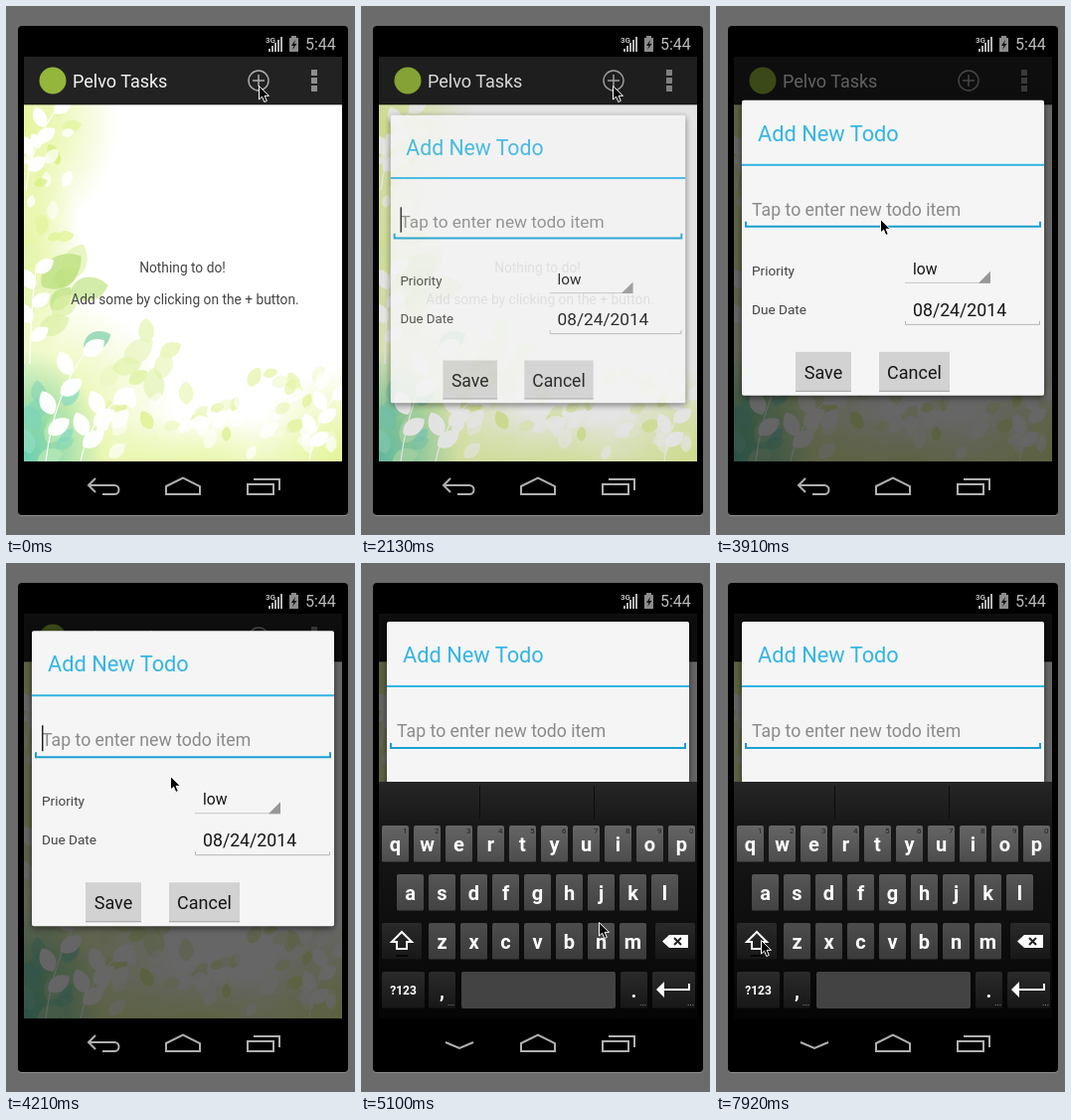
An HTML page that plays this animation: 351 by 532 pixels, repeating every 8 s.

```html
<!DOCTYPE html>
<html lang="en">
<head>
<meta charset="utf-8">
<title>Todo demo</title>
<style>
html, body { margin: 0; width: 100%; height: 100%; overflow: hidden; background: #6b6b6b; }
svg { display: block; width: 351px; height: 532px; }
text { font-family: Roboto, sans-serif; white-space: pre; }
.line { fill: none; stroke: #b0b0b0; stroke-width: 2; }
.card { filter: drop-shadow(0 2px 3px rgba(0, 0, 0, .55)); }
</style>
</head>
<body>
<script>
const LOOP = 8000;

// --- markup helpers ---
const rect = (x, y, w, h, fill, more = '') =>
  `<rect x="${x}" y="${y}" width="${w}" height="${h}" fill="${fill}" ${more}/>`;
const text = (x, y, size, fill, str, more = '') =>
  `<text x="${x}" y="${y}" font-size="${size}" fill="${fill}" ${more}>${str}</text>`;
const path = (d, more) => `<path d="${d}" ${more}/>`;
const group = (id, body, more = '') => `<g id="${id}" ${more}>${body}</g>`;
const MID = 'text-anchor="middle"';
const glow = (id, color, alpha) =>
  `<radialGradient id="${id}"><stop stop-color="${color}" stop-opacity="${alpha}"/>` +
  `<stop offset=".5" stop-color="${color}" stop-opacity="${alpha * .55}"/>` +
  `<stop offset="1" stop-color="${color}" stop-opacity="0"/></radialGradient>`;
const shade = (id, a, b) =>
  `<linearGradient id="${id}" x2="0" y2="1"><stop stop-color="${a}"/><stop offset="1" stop-color="${b}"/></linearGradient>`;
const blob = (x, y, rx, ry, id) => `<ellipse cx="${x}" cy="${y}" rx="${rx}" ry="${ry}" fill="url(#${id})"/>`;

let seed = 11;
const rnd = (a, b) => {
  seed = (seed * 16807) % 2147483647;
  return a + (b - a) * seed / 2147483647;
};

// --- wallpaper ---
const leaf = (x, y, len, angle, fill, alpha) =>
  path('M0 0C.2 -.42 .72 -.42 1 0C.75 .38 .22 .42 0 0',
    `transform="translate(${x} ${y}) rotate(${angle}) scale(${len})" fill="${fill}" opacity="${alpha}"`);

function scatter(n, x0, x1, y0, y1, size, ...colors) {
  let out = '';
  for (let i = 0; i < n; i++)
    out += leaf(rnd(x0, x1), rnd(y0, y1), rnd(.6, 1) * size, rnd(-120, -10), colors[i % colors.length], rnd(.5, .95));
  return out;
}

// a curved stem with leaves on alternating sides
function branch(x, y, height, lean, size) {
  let out = path(`M${x} ${y}q${lean * .2} ${-height * .6} ${lean} ${-height}`,
    'fill="none" stroke="#fff" stroke-width="1.2"');
  for (let k = .25, side = 1; k <= 1; k += .18, side = -side)
    out += leaf(x + lean * k * k, y - height * k, size, -75 + side * 40, '#fff', .95);
  return out;
}

function wallpaper() {
  return rect(18, 51, 320, 407, '#fff') +
    blob(18, 120, 95, 110, 'lime') + blob(18, 250, 60, 110, 'lime') + blob(40, 420, 130, 130, 'lime') +
    blob(190, 470, 150, 60, 'lime') + blob(338, 450, 90, 85, 'lime') +
    scatter(22, 14, 60, 110, 240, 20, '#fff', '#e4f5a0', '#fff', '#d6ef80') +
    scatter(9, 18, 75, 260, 350, 46, '#c3e58a', '#dcf0a4', '#e6f5b8') +
    scatter(8, 95, 160, 320, 400, 36, '#e9f6bc', '#dff2a6') +
    leaf(36, 282, 50, -38, '#bfe283', .8) + leaf(78, 343, 30, -25, '#8fd6b4', .85) +
    blob(18, 450, 80, 105, 'teal') +
    scatter(12, 16, 65, 370, 458, 30, '#7ed3b8', '#b4e6b4', '#8fdcc0') +
    scatter(26, 90, 235, 400, 458, 24, '#fff', '#e0f29a', '#fff', '#edf8c4') +
    scatter(26, 235, 330, 370, 458, 24, '#fff', '#e4f4a4', '#fff', '#f0f9cf') +
    branch(24, 360, 95, 6, 22) + branch(40, 458, 110, 40, 26) + branch(75, 458, 60, 35, 26) +
    branch(20, 185, 80, 30, 22) + branch(305, 458, 65, 25, 22);
}

// --- phone parts ---
function statusBar() {
  let bars = '';
  for (let i = 0; i < 5; i++) bars += rect(264 + i * 3, 43 - i * 3, 2, 3 + i * 3, '#b4b4b4');
  return text(261, 37, 8, '#c4c4c4', '3G', 'font-weight="700"') + bars +
    rect(285, 32, 9, 14, '#8c8c8c') + rect(287, 30, 5, 2, '#8c8c8c') +
    path('M291 34L287 40H289.5L288 44L292.5 38H290Z', 'fill="#111"') +
    text(301, 44, 16, '#bdbdbd', '5:44');
}

function actionBar() {
  return rect(18, 51, 320, 48, '#222') + rect(18, 98, 320, 2, '#000', 'opacity=".3"') +
    rect(226, 51, 56, 48, '#33b5e5', 'id="press" opacity="0"') +
    '<circle cx="47" cy="75" r="13.5" fill="#94b63a"/>' +
    text(67, 82, 18, '#f3f3f3', 'Pelvo Tasks') +
    '<circle cx="254" cy="75" r="10" fill="none" stroke="#b0b0b0" stroke-width="1.4"/>' +
    path('M248 75H260M254 69V81', 'class="line" style="stroke-width:1.5"') +
    [64, 72, 80].map(y => rect(307, y, 6, 6, '#8e8e8e')).join('');
}

function navBar() {
  return path('M97 491H109A4.500 4.500 0 0 0 109 482H83M90 475L83 482L90 489', 'id="back" class="line"') +
    path('M85 482L99 488L113 482', 'id="down" class="line"') +
    path('M161 483L178 474.500L195 483V491H161Z', 'class="line"') +
    path('M243 481H269V491H243ZM249 476H275V487', 'class="line"');
}

const button = (x, w, label) =>
  rect(x, 359, w, 40, '#d3d2d3') + rect(x, 398, w, 1, '#a5a5a5') +
  text(x + w / 2, 386, 18, '#161616', label, MID);

function dialog() {
  return rect(26, 106, 304, 297, '#f5f5f5', 'rx="2" class="card"') +
    text(42, 147, 21.8, '#33b5e5', 'Add New Todo') +
    rect(26, 170, 304, 2, '#33b5e5') +
    text(36, 222, 17.7, '#8a8a8a', 'Tap to enter new todo item') +
    path('M30 228V233H326V228', 'fill="none" stroke="#1a9fd0" stroke-width="2"') +
    rect(36, 201, 1.5, 26, '#222', 'id="caret"') +
    text(36, 282, 13.6, '#444', 'Priority') + text(36, 321, 13.6, '#444', 'Due Date') +
    text(198, 281, 15.7, '#161616', 'low') +
    rect(190, 289, 86, 1, '#c6c6c6') + path('M276 278V290H264Z', 'fill="#979797"') +
    text(198, 323, 17.7, '#161616', '08/24/2014') +
    path('M190.500 328V331.500H325.500V328', 'fill="none" stroke="#b5b5b5"') +
    button(80, 56, 'Save') + button(164, 71, 'Cancel');
}

function key(x, y, w, fill, label = '', size = 20) {
  return rect(x, y, w, 37, fill, 'rx="2"') + rect(x + 1, y + 36, w - 2, 1, '#000', 'opacity=".35"') +
    text(x + w / 2, y + 19 + size * .35, size, '#fff', label, MID + ' font-weight="700"');
}

function keyboard() {
  const row = (letters, x, y, fill) =>
    [...letters].map((c, i) => key(x + i * 32, y, 27, fill, c)).join('');
  const dark = (x, y, w, label, size) => key(x, y, w, 'url(#dark)', label, size);
  const digits = [...'1234567890'].map((d, i) => text(42 + i * 32, 272, 8, '#222', d)).join('');
  const dots = [87, 280, 328].map(x => text(x, 445, 9, '#aaa', '...')).join('');
  return rect(18, 220, 320, 238, 'url(#board)') + rect(18, 220, 320, 40, 'url(#strip)') +
    rect(119, 224, 1, 33, '#0c0c0c') + rect(234, 224, 1, 33, '#0c0c0c') +
    row('qwertyuiop', 21, 264, 'url(#k1)') + digits +
    row('asdfghjkl', 36, 313, 'url(#k2)') + row('zxcvbnm', 68, 362, 'url(#k3)') +
    dark(21, 362, 40) + dark(296, 362, 40) + dark(21, 411, 43, '?123', 12) +
    dark(68, 411, 27, ',') + dark(261, 411, 27, '.') + dark(293, 411, 43) +
    rect(101, 411, 155, 37, '#434343', 'rx="2"') +
    path('M41 371L51 381H46V388H36V381H31Z', 'fill="none" stroke="#fff" stroke-width="2"') +
    rect(35, 394, 12, 2, '#050505') +
    path('M303 380.500L310 374H329V387H310Z', 'fill="#fff"') +
    path('M315 377L322 384M322 377L315 384', 'stroke="#222" stroke-width="2"') +
    path('M297 429L305 421V428H329V423H331V430H305V437Z', 'fill="#fff"') + dots;
}

document.body.innerHTML = `<svg viewBox="0 0 351 532" xmlns="http://www.w3.org/2000/svg"><defs>
${glow('lime', '#d3ee5c', .62)}${glow('teal', '#3fbfae', .75)}
${shade('board', '#1c1c1c', '#050505')}${shade('strip', '#262626', '#191919')}${shade('dark', '#2a2a2a', '#171717')}
${shade('k1', '#656565', '#4c4c4c')}${shade('k2', '#565656', '#424242')}${shade('k3', '#4d4d4d', '#3a3a3a')}
<clipPath id="screen"><rect x="18" y="51" width="320" height="407"/></clipPath></defs>` +
  rect(0, 0, 351, 532, '#6b6b6b') + rect(12, 20, 332, 493, '#8f8f8f', 'rx="4"') +
  rect(12, 20, 332, 492, '#000', 'rx="4"') + statusBar() +
  group('view', wallpaper() +
    text(177.5, 268, 13.75, '#444', 'Nothing to do!', MID) +
    text(180, 300, 13.75, '#444', 'Add some by clicking on the + button.', MID) +
    actionBar() + rect(18, 51, 320, 407, '#000', 'id="dim"') +
    group('dialog', dialog()) + group('keys', keyboard()), 'clip-path="url(#screen)"') +
  navBar() +
  path('M.5 .5V14L3.600 11.200L5.800 16.500L8.300 15.400L6.100 10.300H10.500Z',
    'id="cursor" fill="#000" stroke="#fff" stroke-width="1"') + '</svg>';

// --- motion ---
const ramp = (t, from, to) => Math.min(1, Math.max(0, (t - from) / (to - from)));
const easeOut = k => 1 - (1 - k) ** 2;
const smooth = k => k * k * (3 - 2 * k);

// the screen refreshes at a fixed rate
const TICK = 148.5, PHASE = 492;
const snap = t => PHASE + TICK * Math.floor((t - PHASE) / TICK);

// places the pointer passes: time, x, y
const stops = [[400, 254, 80], [490, 253, 80], [2560, 253, 80], [3020, 164, 243], [3470, 165, 214],
  [4360, 165, 214], [4800, 189, 269], [5095, 239, 361], [6140, 160, 343], [6600, 160, 343],
  [6890, 172, 349], [7915, 45, 379]];

function pointer(t) {
  let [, x, y] = stops[0];
  for (let i = 1; i < stops.length; i++) {
    const k = smooth(ramp(t, stops[i - 1][0], stops[i][0]));
    x += (stops[i][1] - x) * k;
    y += (stops[i][2] - y) * k;
  }
  return `translate(${Math.round(x)} ${Math.round(y)})`;
}

const set = (id, name, value) => document.getElementById(id).setAttribute(name, value);

function draw(time) {
  const t = snap(time);
  const open = easeOut(ramp(t, 1840, 2280));
  const pan = -47 * easeOut(ramp(t, 3820, 4510));
  const rise = ramp(t, 4480, 5095);
  const caretOn = t > 2120 && (t - 2120) % 1040 < 290;
  set('cursor', 'transform', pointer(t));
  set('press', 'opacity', t < 1680 ? .7 * ramp(t, 900, 1230) : 0);
  set('dim', 'opacity', .6 * ramp(t, 2060, 2425));
  set('dialog', 'opacity', open);
  set('dialog', 'transform', `translate(178 ${254.5 + pan}) scale(${.8 + .2 * open}) translate(-178 -254.5)`);
  set('caret', 'opacity', +caretOn);
  set('keys', 'opacity', rise);
  set('keys', 'transform', `translate(0 ${48 * (1 - rise ** 4)})`);
  set('back', 'opacity', +(rise === 0));
  set('down', 'opacity', +(rise > 0));
}

const start = performance.now();
function frame() {
  draw((performance.now() - start) % LOOP);
  requestAnimationFrame(frame);
}
frame();
</script>
</body>
</html>
```
